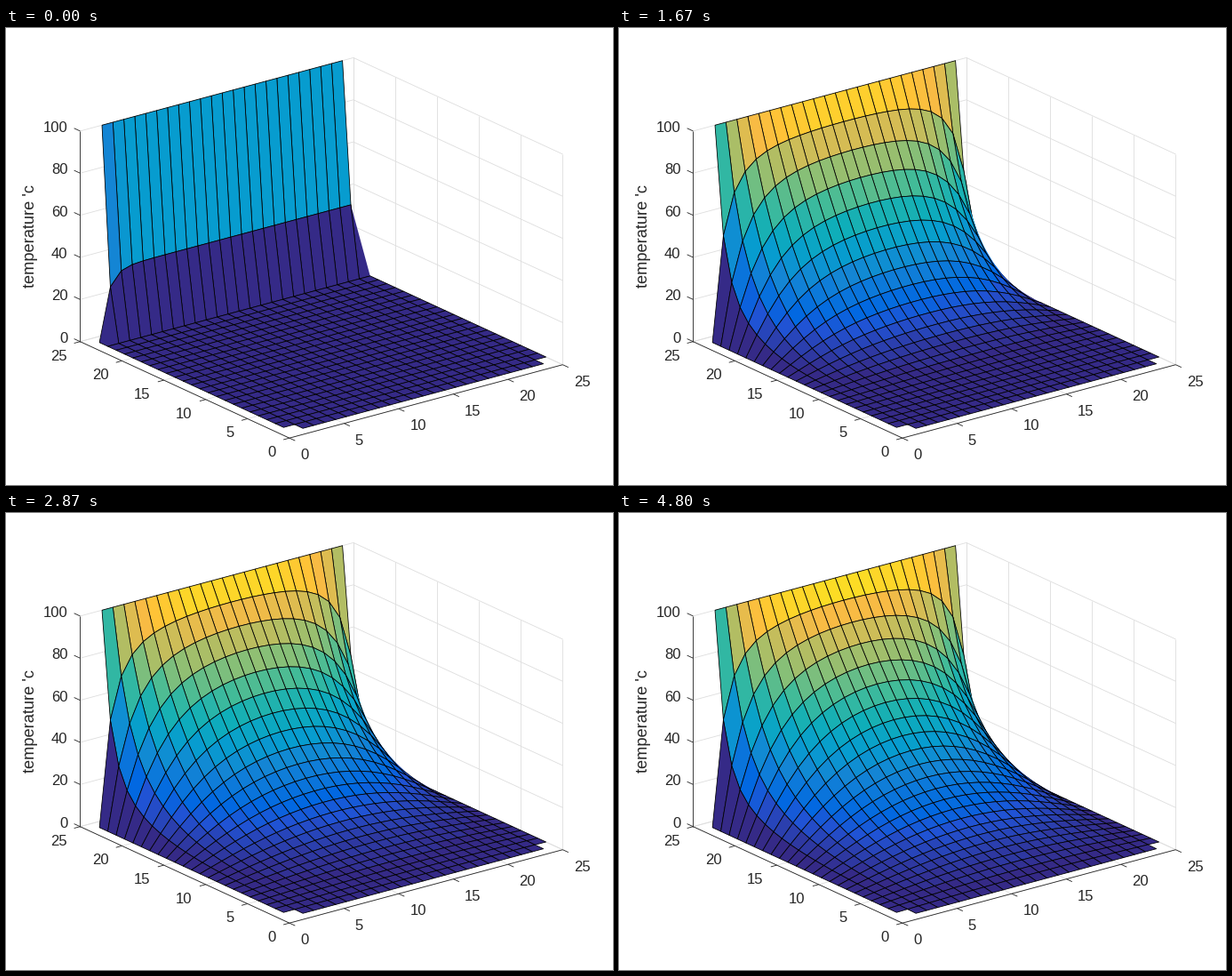
A matplotlib script for the animation above (5.3 s loop, 683 by 514 pixels).

```python
import numpy as np
import matplotlib.pyplot as plt
from matplotlib.animation import FuncAnimation
from matplotlib.collections import LineCollection, PolyCollection
from matplotlib.colors import LinearSegmentedColormap

W, H, DPI = 683, 514, 128
LOOP, STEP = 5300, 20       # ms
RATE, HOLD = 15, 4          # states per second, ticks before the first change
STATES = 69
SWEEPS = 2.25               # solver passes per state
N = 25                      # grid points per side
INK = "#262626"

# Blue to yellow in 64 steps, from a few stops
STOPS = {0: "#352a87", 6: "#2053d4", 9: "#0268e1", 16: "#1485d4",
         21: "#079ccf", 27: "#0faeb9", 33: "#42bb98", 39: "#87bf77",
         52: "#f8bb44", 54: "#ffc337", 63: "#f9fb0e"}
CMAP = LinearSegmentedColormap.from_list(
    "heat", [(i / 63, c) for i, c in STOPS.items()], N=64)


def px(size):
    """Pixels to points."""
    return size * 72 / DPI


def proj(x, y, z=0):
    """Orthographic view of the box, in stage pixels."""
    return np.stack(np.broadcast_arrays(
        318.9 + 12.3 * x - 9.42 * y,
        461.2 - 3.3 * x - 4.34 * y - 2.368 * z), axis=-1)


def sweep(t):
    """One Gauss-Seidel pass over the inner points, t[y][x]."""
    for j in range(1, N - 1):
        for i in range(1, N - 1):
            t[j][i] = (t[j][i - 1] + t[j][i + 1] + t[j - 1][i] + t[j + 1][i]) / 4


def solve():
    """Temperature fields, one per visible state."""
    t = [[0.0] * N for _ in range(N - 1)] + [[100.0] * N]
    fields, done = [], 0
    for k in range(STATES):
        while done < 1 + SWEEPS * k:
            sweep(t)
            done += 1
        fields.append(np.array(t))
    return fields


# Cells from back to front, without the four corners
last = N - 2
CELLS = np.array([(j, i) for j in range(last, -1, -1) for i in range(last, -1, -1)
                  if not (j in (0, last) and i in (0, last))])
J, I = CELLS.T
GX, GY = np.meshgrid(np.arange(1, N + 1), np.arange(1, N + 1))


def mesh(t):
    """Outlines and colours of all cells; folded cells keep their front half."""
    p = proj(GX, GY, t)
    front, back = p[J, I], p[J + 1, I + 1]
    a, b = p[J + 1, I], p[J, I + 1]

    def side(q):
        d, e = b - a, q - a
        return d[:, 0] * e[:, 1] - d[:, 1] * e[:, 0]

    folded = side(front) * side(back) > 0
    whole = np.stack([a, back, b, front, a], axis=1)
    half = np.stack([a, a, a, front, b], axis=1)
    verts = np.where(folded[:, None, None], half, whole)
    shade = np.clip((t[J, I] * 0.64).astype(int), 0, 63)
    return verts, CMAP(shade)


fig = plt.figure(figsize=(W / DPI, H / DPI), dpi=DPI, facecolor="white")
ax = fig.add_axes([0, 0, 1, 1])
ax.set_xlim(0, W)
ax.set_ylim(H, 0)
ax.axis("off")


def lines(ends, color, z):
    segs = [(proj(*p), proj(*q)) for p, q in ends]
    ax.add_collection(LineCollection(segs, colors=color, linewidths=px(0.85), zorder=z),
                      autolim=False)


def label(x, y, s, ha, size=16.67, **kw):
    ax.text(x, y, s, ha=ha, va="baseline", color=INK, family="Liberation Sans",
            fontsize=px(size), **kw)


# Grid on the floor and the two back walls
grid = []
for v in range(0, 26, 5):
    grid += [((v, 0, 0), (v, 25, 0)), ((0, v, 0), (25, v, 0)),
             ((v, 25, 0), (v, 25, 100)), ((25, v, 0), (25, v, 100))]
for v in range(0, 101, 20):
    grid += [((0, 25, v), (25, 25, v)), ((25, 0, v), (25, 25, v))]
lines(grid, "#dedede", 1)

# Axes, ticks and numbers
axes = [((0, 0, 0), (25, 0, 0)), ((0, 0, 0), (0, 25, 0)), ((0, 25, 0), (0, 25, 100))]
for v in range(0, 26, 5):
    axes += [((v, 0, 0), (v, -0.68, 0)), ((0, v, 0), (-0.55, v, 0))]
    x, y = proj(v, 0)
    label(x + 12.4, y + 24, str(v), "left")
    x, y = proj(0, v)
    label(x - 15, y + 21, str(v), "right")
for v in range(0, 101, 20):
    axes.append(((0, 25, v), (0, 25.72, v)))
    x, y = proj(0, 25, v)
    label(x - 14, y + 1, str(v), "right")
lines(axes, INK, 2)
label(31.5, 234.5, "temperature 'c", "center", 18.33, rotation=90, rotation_mode="anchor")

frames = [mesh(t) for t in solve()]
surface = PolyCollection(frames[0][0], closed=False, facecolors=frames[0][1],
                         edgecolors="black", linewidths=px(0.8), zorder=3)
surface.set_joinstyle("round")
ax.add_collection(surface, autolim=False)


def update(n):
    tick = int((n + 0.5) * STEP * RATE / 1000)
    verts, colors = frames[min(max(tick - HOLD, 0), STATES - 1)]
    surface.set_verts(verts, closed=False)
    surface.set_facecolor(colors)
    return [surface]


anim = FuncAnimation(fig, update, frames=LOOP // STEP, interval=STEP,
                     repeat=True, repeat_delay=0, blit=False)
plt.show()
```
